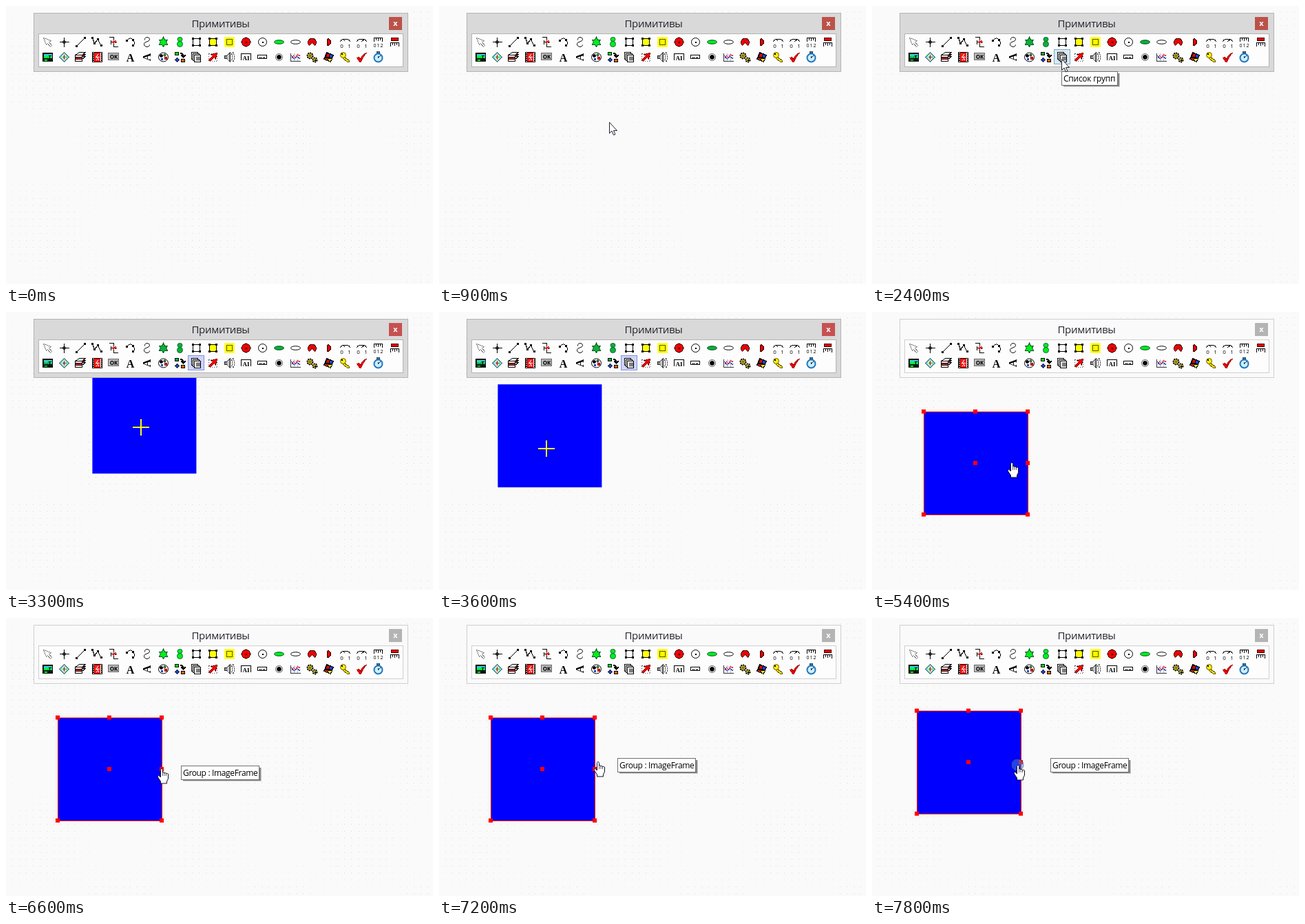
Recreate the animation shown at these times as an HTML page. Size 620 by 405 pixels, loop 8 s.

```html
<!DOCTYPE html>
<html lang="ru">
<head>
<meta charset="utf-8">
<title>Примитивы</title>
<style>
  html, body { margin: 0; width: 100%; height: 100%; overflow: hidden; background: #fafafa; }
  svg { display: block; width: 100%; height: 100%; }
  text { font-family: "Open Sans", "Noto Sans", sans-serif; }
  .serif { font-family: "Liberation Serif", "Noto Serif", serif; }
  #icons { shape-rendering: crispEdges; }
  #cross { mix-blend-mode: difference; }
</style>
</head>
<body>
<svg viewBox="0 0 620 405" preserveAspectRatio="none">
  <rect width="620" height="405" fill="#fafafa"/>
  <g id="grid" shape-rendering="crispEdges"></g>

  <g id="shape">
    <rect x=".4" y=".4" width="151" height="150" fill="#00f"/>
    <g id="marks"></g>
  </g>

  <rect id="panel" x="40.5" y="10.5" width="543" height="85"/>
  <text x="311.500" y="31" font-size="15" letter-spacing="-.3" text-anchor="middle" fill="#26242c">Примитивы</text>
  <rect id="close" x="556" y="16" width="19" height="19"/>
  <text x="565.5" y="29" font-size="11" font-weight="700" text-anchor="middle" fill="#fff">x</text>
  <rect id="tray" x="47.5" y="40.5" width="529" height="48" fill="#fdfdfd"/>
  <rect id="button" x="264.5" y="63.5" width="23" height="21"/>
  <g id="icons"></g>

  <g id="tip">
    <rect x="3" y="3" width="82" height="20" fill="#000" opacity=".18"/>
    <rect x="3" y="3" width="81" height="19" fill="#000" opacity=".35"/>
    <rect x=".5" y=".5" width="81" height="20" fill="#fff" stroke="#707070"/>
    <text x="3" y="14.5" font-size="12" fill="#000"></text>
  </g>

  <circle id="ring"/>
  <path id="arrow" d="M.5.5V16.500L4 13l2.500 6 2.500-1-2.500-5.500H11.500Z" fill="#fff" stroke="#223"/>
  <g id="hand" stroke="#112">
    <path d="M0 .5c-1 0-1.500 1-1.500 2V13l-2-2c-1-1-3 0-2 2l4 6v3h9v-3l2-4V9c0-2-2-2-3-1 0-2-2-2-3-1 0-2-2-2-2-1V2.500c0-1-.5-2-1.500-2z" fill="#fff"/>
    <path d="M1.500 6v5M4 7v4M6.500 8v3" fill="none" stroke-width=".7"/>
  </g>
  <path id="cross" d="M-12 0H12M0-12V12" stroke="#fff" stroke-width="2"/>
</svg>

<script>
const $ = id => document.getElementById(id);
const set = (el, attrs) => { for (const a in attrs) el.setAttribute(a, attrs[a]); };
const show = (el, on) => el.setAttribute('visibility', on ? 'visible' : 'hidden');
const move = (el, x, y) => el.setAttribute('transform', `translate(${x} ${y})`);

// Dotted background with slow moiré fading
const tiers = { '#e8e8e8': '', '#d8d8d8': '' };
for (let y = 8; y < 403; y += 10.08)
  for (let x = 9; x < 614; x += 10.05) {
    const v = Math.cos((x - 50) * Math.PI / 115) * Math.cos((y - 100) * Math.PI / 112);
    if (v > -.4) tiers[v > .15 ? '#d8d8d8' : '#e8e8e8'] += `M${Math.round(x)} ${Math.round(y)}h1v1h-1z`;
  }
$('grid').innerHTML = Object.entries(tiers).map(([f, d]) => `<path d="${d}" fill="${f}"/>`).join('');

// Icon helpers, all around a centre at 0,0
const K = '#000', W = '#fff', R = '#f00', Y = '#ff0', B = '#24c', G = 'currentColor';
const p = (d, f = 'none', s = K, w = 1, more = '') =>
  `<path d="${d}" fill="${f}" stroke="${s}" stroke-width="${w}" ${more}/>`;
const box = (x, y, w, h, f, s = K, more) => p(`M${x} ${y}h${w}v${h}h${-w}z`, f, s, 1, more);
const oval = (x, y, a, b, f = 'none', s = K, more = '') =>
  `<ellipse cx="${x}" cy="${y}" rx="${a}" ry="${b}" fill="${f}" stroke="${s}" shape-rendering="auto" ${more}/>`;
const dots = (...q) => q.map(([x, y]) => box(x - 1, y - 1, 2, 2, K)).join('');
const word = (s, x, y, size, more = '') =>
  `<text x="${x}" y="${y}" font-size="${size}" text-anchor="middle" ${more}>${s}</text>`;
const poly = (n, r) => 'M' + Array.from({ length: n }, (_, i) => {
  const a = i * 2 * Math.PI / n, q = r[i % r.length];
  return (q * Math.sin(a)).toFixed(1) + ' ' + (-q * Math.cos(a)).toFixed(1);
}).join('L') + 'z';
const frame = f => box(-5, -5, 10, 10, f) + dots([-5, -5], [5, -5], [-5, 5], [5, 5]);
const dial = tip => p('M-8 0-6-2-4-4H4L6-2 8 0M-6-4v1M6-4v1') + p(`M0-1L${tip}`) +
  word('0', -5, 8, 8) + word('1', 6, 8, 8);
const ruler = y => p(`M-6 ${y + 5}V${y}H6V${y + 5}M-3 ${y}v3M0 ${y}v4M3 ${y}v3`);
const bold = 'class="serif" font-weight="700"';

const top1 = [
  p('M-6-6 5-2 2 0 6 5 4 7 0 2-2 4Z', W, '#888'),
  p('M-7 0H7M0-7V7') + oval(0, 0, 2, 2),
  p('M-6 6 6-6') + dots([-6, 6], [6, -6]),
  p('M-7-6-4 2 1-4 5 5') + dots([-7, -6], [-4, 2], [1, -4], [6, 5]),
  p('M-7-7H0V7H6M-4-3V3M-4 0H4') + p('M0-4V2M-1 1 4-3M1 0 4 2', 'none', R),
  p('M-5-2Q0-9 4-3T4 5') + dots([-5, -2], [4, -3], [4, 5]),
  p('M-3-3C-4-8 4-8 4-4 4 0-4-1-4 3-4 8 4 8 4 4', 'none', K, 1, 'shape-rendering="auto"'),
  p(poly(12, [7, 4]), G, '#052'),
  oval(0, 3, 4, 4, G, '#063') + oval(0, -4, 3.500, 3, G, '#063'),
  frame('none'),
  frame(Y),
  box(-7, -7, 14, 14, Y, '#ff4') + box(-4, -4, 8, 8, 'none', '#550'),
  p(poly(8, [6.500]), '#e00', '#400') + box(0, 0, 1, 1, K),
  oval(0, 0, 6, 6, W) + box(0, 0, 1, 1, K),
  oval(0, 0, 7, 2.800, G, '#042'),
  oval(0, 0, 7, 2.800, W),
  p('M-4 5L0 1 4 5A6 6 0 1 0-4 5', '#e00', '#300'),
  p('M-2-5V5A5 5 0 0 0-2-5', '#e00', '#300'),
  dial('-3-4'),
  dial('4-4'),
  ruler(-6) + word('0', -5, 7, 7) + word('1', 0, 7, 7) + word('2', 5, 7, 7),
  box(-5, -6, 10, 4, '#e00', '#400') + ruler(1)
];

const top2 = [
  box(-7, -6, 14, 12, '#021') + box(-6, -5, 12, 5, '#3cc', 'none') + p('M-6 1V-2L-2 0 1-3 6 1z', G, 'none') +
    p('M3 4V-3M1-2H5') + box(-5, 3, 4, 2, G, 'none'),
  p('M0-7 7 0 0 7-7 0z', '#7dd', '#244') + p('M0-4 3 0 0 4-3 0z', R, W) + p('M-3 0H3', 'none', G),
  [3, 0, -3].map(y => p(`M-8 ${y}l6-4h9l-5 4v3h-10z`, y ? W : '#c22') + p(`M-8 ${y}h10l5-4`)).join(''),
  box(-7, -7, 14, 14, W) + box(-4, -6, 8, 12, '#e22', R) +
    p('M-6-6V7M6-6V7', 'none', K, 2, 'stroke-dasharray="2 1"') +
    p('M1-4-1-1 1 2-2 5M-3 0H3M1 2 3 5', 'none', W),
  box(-8, -6, 15, 10, '#bbb', '#666') + word('OK', 0, 2, 8, 'font-weight="700"'),
  word('A', 0, 6, 16, bold),
  word('A', 0, 5, 16, bold + ' transform="rotate(-90)"'),
  oval(0, 0, 7, 6.500, W) + oval(-3, -2, 2, 2, K) + oval(2, -3, 1.500, 1.500, G) +
    box(-3, 2, 2, 2, B, B) + box(2, 0, 3, 3, R, '#900'),
  box(-7, -7, 5, 4, G) + p('M0-6Q5-6 5-1M2-3 5 0 8-3', 'none', K, 2) + p('M-4 1-1 4-4 7-7 4z', B) + box(2, 3, 5, 4, '#e60'),
  [-7, -5, -3].map(v => box(v, v, 9, 10, W)).join('') + p('M-1 0H5M-1 2H5M-1 4H5'),
  box(-6, -5, 12, 11, 'none', '#555', 'stroke-dasharray="1 2"') + p('M-6 4 0-2-3-4 6-6 4 3 2 0-4 6z', R, '#700'),
  p('M-7-2H-4L1-7V7L-4 2H-7z', '#999', '#222') + p('M-2-4V4', 'none', W) +
    p('M3-5Q6 0 3 5M5-7Q9 0 5 7', 'none', '#333', 1, 'stroke-dasharray="2 1"'),
  p('M-7 4V-5H7V4M-7-5v3M7-5v3') + word('AI', 0, 4, 9, bold),
  box(-7, -3, 13, 5, W) + p('M-4-1V1M-2-1V1M1-1V1M3-1V1'),
  oval(0, 0, 5, 5, W, '#555') + oval(0, 0, 3, 3, K),
  p('M-7-6V6H7', '#fff', '#333') + p('M-5-3H7M-5 1H7M-2-6V5M3-6V5', 'none', '#bbc') +
    p('M-6 2-3-2 0 1 3-4 7-1', 'none', R) + p('M-6-2-2 3 2-1 7 3', 'none', B),
  oval(-3, -2, 4, 4, '#cb2', K, 'stroke-width="2" stroke-dasharray="2 1"') + oval(-3, -2, 1, 1, W) +
    oval(4, 4, 3, 3, '#dc3', K, 'stroke-width="2" stroke-dasharray="2 1"') + box(4, 4, 1, 1, W),
  p('M-3-7 7-3 3 7-7 3z', K) + p('M-2-5 1-4 0 0-4-1z', R, 'none') + p('M2-4 6-2 4 1 1 0z', B, 'none') +
    p('M-5 1-1 2-2 5-6 3z', '#a22', 'none') + p('M0 2 4 3 2 6-1 4z', Y, 'none'),
  p('M-1 0 6 5V7H3L-3 2z', '#ed0', '#650') + oval(-3, -3, 4, 4, '#fe0', '#650') + box(-5, -5, 1, 1, W),
  p('M-7 1-4 0-2 3Q1-4 7-6 1 0-1 7H-3z', '#e00', '#a00'),
  box(-2, -8, 4, 2, '#48b', '#246') + oval(0, 1, 6, 6, '#cef', '#27b', 'stroke-width="2"') + p('M0 1 3-2M0 1V-2', 'none', '#124')
];

$('icons').innerHTML = [top1, top2].map((row, j) => row.map((s, i) =>
  `<g transform="translate(${60.5 + 24 * i} ${52.5 + 22 * j})">${s}</g>`).join('')).join('');

$('marks').innerHTML = p('M.5.5h151v150h-151z', 'none', R) +
  [[0, 0], [75, 0], [151, 0], [75, 75], [151, 75], [0, 150], [151, 150]].map(([x, y]) =>
    `<rect x="${x - 3}" y="${y - 3}" width="6" height="6" fill="red"/>`).join('');

// Pointer per step: [first step, kind, x, y]
const track = [
  [0, ''], [2, 'arrow', 216, 288], [3, 'arrow', 247, 169], [4, 'arrow', 263, 120], [5, 'arrow', 273, 85],
  [6, 'arrow', 275, 77], [10, 'cross', 256, 118], [11, 'cross', 196, 168], [12, 'cross', 156, 199],
  [13, 'cross', 150, 217], [14, 'hand', 149, 219], [17, 'hand', 172, 219], [18, 'hand', 203, 219],
  [19, 'hand', 222, 219], [20, 'hand', 226, 219], [23, 'hand', 231, 209], [25, 'hand', 222, 211], [26, 'hand', 212, 214]
];
// Square corner: [first step, x, y]
const places = [[11, 125, 85], [12, 85, 105], [13, 75, 145], [26, 65, 135]];
// Click rings: step -> [x, y, radius, opacity]
const rings = { 9: [275, 77, 8, .5], 14: [148, 218, 6, .5], 15: [148, 217, 11, .25], 26: [211, 214, 9, .5] };
const at = (list, k) => list.filter(e => e[0] <= k).pop();

function tooltip(k) {
  const list = k === 7 || k === 8, info = k >= 20;
  show($('tip'), list || info);
  const [soft, shade, plate, label] = $('tip').children, w = list ? 81 : 113;
  set(soft, { width: w + 1 });
  set(shade, { width: w });
  set(plate, { width: w });
  label.textContent = list ? 'Список групп' : 'Group : ImageFrame';
  set(label, { 'letter-spacing': list ? -.25 : -.35 });
  list ? move($('tip'), 275, 95) : k < 23 ? move($('tip'), 254, 215) : move($('tip'), 259, 204);
}

function draw(k) {
  const [, kind, x, y] = at(track, k);
  for (const id of ['arrow', 'hand', 'cross']) {
    show($(id), id === kind);
    if (id === kind) move($(id), x, y);
  }

  const spot = at(places, k);
  show($('shape'), spot);
  if (spot) move($('shape'), spot[1], spot[2]);
  $('marks').style.display = k >= 16 ? '' : 'none';

  const active = k < 14, picked = k >= 9;
  set($('panel'), { fill: active ? '#d9d9d9' : '#fafafa', stroke: active ? '#b4b4b4' : '#cfcfcf' });
  set($('tray'), { stroke: active ? '#b4b4b4' : '#cfcfcf' });
  set($('close'), { fill: !active ? '#b4b4b4' : picked ? '#c75050' : '#bb5249' });
  set($('button'), { fill: picked ? '#d0d4fa' : '#d8eaf4', stroke: picked ? '#8490dc' : '#7fa6be' });
  show($('button'), k >= 5 && active);
  $('icons').style.color = k < 5 || k >= 16 ? '#00f01c' : '#0cb038';

  const ring = rings[k];
  show($('ring'), ring);
  if (ring) set($('ring'), {
    cx: ring[0], cy: ring[1], r: ring[2], opacity: ring[3],
    fill: k === 26 ? '#4a86d0' : 'none', stroke: k === 26 ? '#124' : '#88a0ff', 'stroke-width': k === 26 ? 1 : 3
  });
  tooltip(k);
}

const start = performance.now();
let last = -1;
function tick() {
  const k = Math.floor((performance.now() - start) % 8000 / 300);
  if (k !== last) draw(last = k);
  requestAnimationFrame(tick);
}
tick();
</script>
</body>
</html>
```
